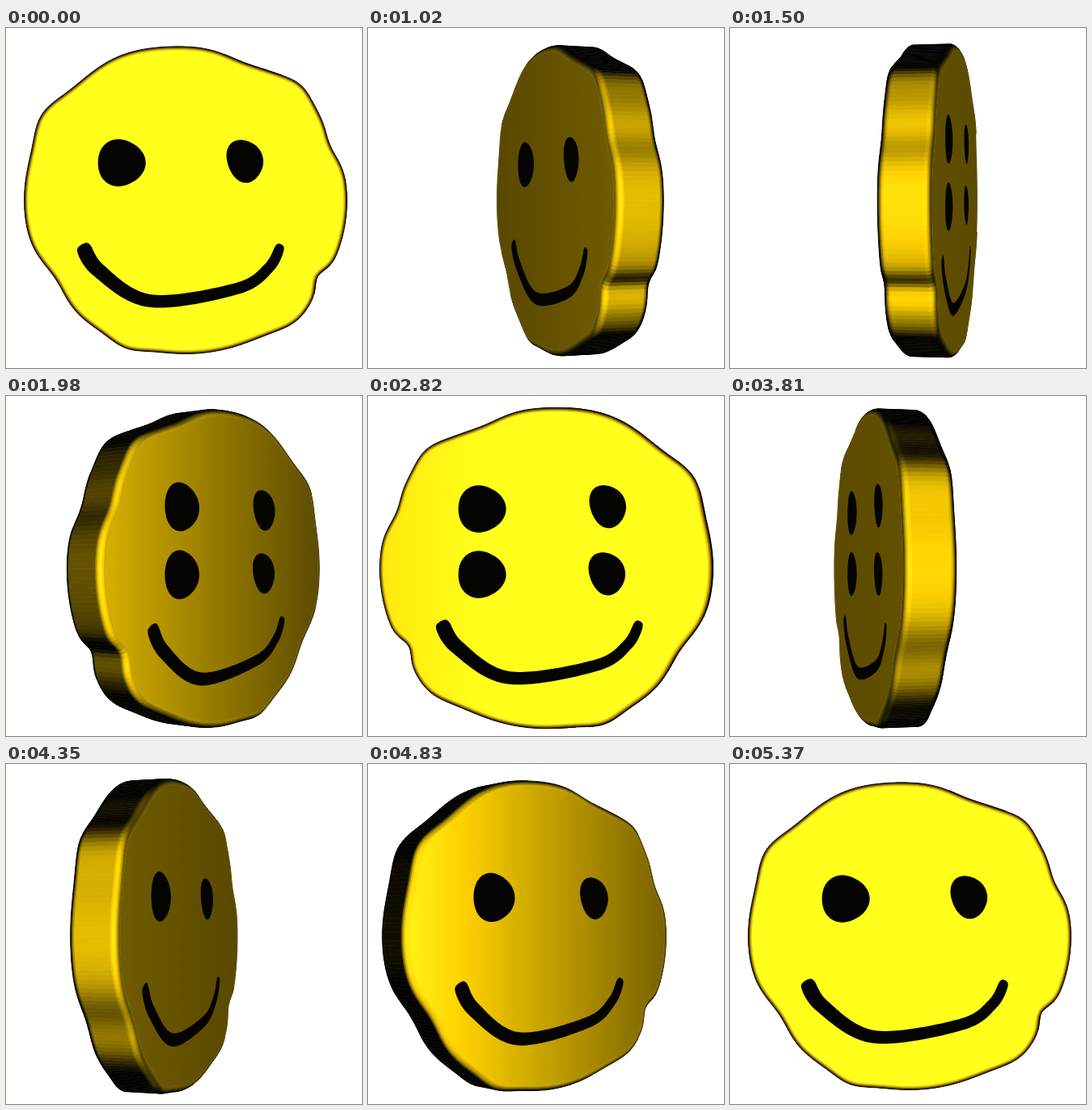
Write an HTML page with a canvas that moves like this. It is 440 by 420 pixels and loops after 5.4 s.

```html
<!DOCTYPE html>
<html lang="en">
<head>
<meta charset="utf-8">
<title>Turning smiley coin</title>
<style>
html, body { margin: 0; width: 100%; height: 100%; overflow: hidden; background: #fff; }
canvas { display: block; }
</style>
</head>
<body>
<canvas id="stage" width="440" height="420"></canvas>
<script>
const ctx = document.getElementById('stage').getContext('2d');
const CX = 223, CY = 212, CAMERA = 1400, RADIUS = 200;
const FRONT = 0, BACK = -59, BEVEL = 8, BEVEL_STEPS = 6;
const LOOP = 5400, STEP = 30, TURN = 2 * Math.PI;
const BACK_POSE = TURN * 2820 / (LOOP - STEP);

const clamp = (v, lo, hi) => Math.min(hi, Math.max(lo, v));
const sample = (n, fn) => Array.from({ length: n }, (_, i) => fn(i / n));

// Dents and bulges of the hand-drawn rim: angle and spread in degrees, height in pixels.
const bumps = [
  { at: 30, height: -9, spread: 5 },
  { at: 47, height: 8, spread: 10 },
  { at: 112, height: 6, spread: 8 },
  { at: 149, height: -9, spread: 11 },
  { at: 211, height: 10, spread: 10 },
  { at: 245, height: 5, spread: 17 },
  { at: 293, height: -6, spread: 11 },
  { at: 315, height: 7, spread: 8 },
  { at: 339, height: -7, spread: 8 }
];

const outline = sample(240, t => {
  const a = t * TURN;
  const r = bumps.reduce((sum, b) => sum + b.height * Math.exp(-(((t * 360 - b.at) / b.spread) ** 2)),
    194.5 + 5 * Math.cos(2 * a));
  return [222 + r * Math.cos(a), 213 + r * Math.sin(a)];
});

// Ellipse with three soft corners.
function blob(cx, cy, rx, ry, tilt) {
  const c = Math.cos(tilt), s = Math.sin(tilt);
  return sample(48, t => {
    const a = t * TURN, k = 1 + 0.04 * Math.cos(3 * a);
    const x = rx * k * Math.cos(a), y = ry * k * Math.sin(a);
    return [cx + x * c - y * s, cy + x * s + y * c];
  });
}

// Point and direction on an open Catmull-Rom curve, t from 0 to 1.
function along(keys, t) {
  const u = t * (keys.length - 1), i = Math.min(Math.floor(u), keys.length - 2), f = u - i;
  const key = j => keys[clamp(j, 0, keys.length - 1)];
  return [0, 1].map(k => {
    const [a, b, c, d] = [-1, 0, 1, 2].map(o => key(i + o)[k]);
    return b + f / 2 * (c - a + f * (2 * a - 5 * b + 4 * c - d + f * (3 * (b - c) + d - a)));
  });
}

// Brush stroke with round ends, thinner towards its end.
function brush(keys) {
  const count = 120, left = [], right = [];
  for (let i = 0; i <= count; i++) {
    const t = i / count, [x, y] = along(keys, t);
    const a = along(keys, Math.max(0, t - 0.01)), b = along(keys, Math.min(1, t + 0.01));
    const dx = b[0] - a[0], dy = b[1] - a[1], len = Math.hypot(dx, dy);
    const w = (6.5 + 4 * (1 - t) ** 2) * Math.sqrt(1 - (2 * t - 1) ** 16);
    left.push([x + dy / len * w, y - dx / len * w]);
    right.unshift([x - dy / len * w, y + dx / len * w]);
  }
  return left.concat(right);
}

const leftEye = blob(142, 166.5, 29.5, 29, 0);
const rightEye = blob(295, 164, 22, 27, -0.35);
const mouth = brush([[94, 267], [114, 299], [178, 337], [285, 322], [325, 296], [340, 267]]);

function rotate([x, y, z], angle) {
  const c = Math.cos(angle), s = Math.sin(angle);
  return [x * c - z * s, y, x * s + z * c];
}

function project(point, angle) {
  const [x, y, z] = rotate(point, angle), k = CAMERA / (CAMERA - z);
  return [CX + x * k, CY + y * k];
}

// Places a stage position on the coin plane z as seen at the given angle.
function unproject([px, py], angle, z) {
  const c = Math.cos(angle), s = Math.sin(angle), sx = px - CX;
  const x = (sx * (CAMERA - z * c) + CAMERA * z * s) / (CAMERA * c + sx * s);
  return [x, (py - CY) * (CAMERA - x * s - z * c) / CAMERA, z];
}

const onFront = shape => shape.map(p => unproject(p, 0, FRONT));
const onBack = (shape, dx, dy) =>
  shape.map(([x, y]) => unproject([x + dx, y + dy], BACK_POSE, BACK));

const frontFeatures = [leftEye, rightEye, mouth].map(onFront);
const backFeatures = [
  onBack(leftEye, -2, -27), onBack(leftEye, -2, 54),
  onBack(rightEye, 1, -28), onBack(rightEye, 0, 55),
  onBack(mouth, -4, 11)
];

const edge = outline.map(p => unproject(p, 0, FRONT - BEVEL));
const normals = edge.map((_, i) => {
  const n = edge.length, a = edge[(i + n - 1) % n], b = edge[(i + 1) % n];
  const tx = b[0] - a[0], ty = b[1] - a[1], len = Math.hypot(tx, ty);
  return [ty / len, -tx / len];
});

// Rings run from the front face over both rounded edges to the back face.
const rings = [];
for (let i = 0; i <= BEVEL_STEPS * 2 + 1; i++) {
  const front = i <= BEVEL_STEPS;
  const tilt = (front ? i : i - 1) / BEVEL_STEPS * Math.PI / 2;
  const inset = BEVEL * (1 - Math.sin(tilt));
  const z = front ? FRONT - BEVEL * (1 - Math.cos(tilt)) : BACK + BEVEL * (1 + Math.cos(tilt));
  rings.push({ tilt, points: edge.map(([x, y], j) =>
    [x - normals[j][0] * inset, y - normals[j][1] * inset, z]) });
}

function gold(v) {
  const base = 255 * Math.pow(clamp(v / 0.92, 0.03, 1), 1.2);
  const glow = clamp((v - 0.92) / 0.16, 0, 1);
  return `rgb(${base | 0},${base * (0.82 + 0.18 * glow) | 0},${27 * glow | 0})`;
}

// side runs from -1 to 1 across the face.
function faceLight(angle, side) {
  const c = Math.abs(Math.cos(angle));
  return 0.4 + 0.77 * c ** 3.5 + 0.9 * Math.sin(angle) * c ** 3 * side;
}

function edgeLight(point, normal, angle) {
  const [x, y, z] = rotate(point, angle), [nx, ny, nz] = rotate(normal, angle);
  const lz = CAMERA - z;
  return 1.75 * ((lz * nz - x * nx - y * ny) / Math.hypot(x, y, lz) - 0.42);
}

function trace(points) {
  ctx.beginPath();
  points.forEach(([x, y]) => ctx.lineTo(x, y));
  ctx.closePath();
}

function drawStrip(inner, outer, a, b, angle, facing) {
  const tilt = (inner.tilt + outer.tilt) / 2, ct = Math.cos(tilt), st = Math.sin(tilt);
  const n = edge.length;
  for (let j = 0; j < n; j++) {
    const k = (j + 1) % n, quad = [a[j], a[k], b[k], b[j]];
    const area = quad.reduce((sum, p, i) => {
      const q = quad[(i + 1) % 4];
      return sum + p[0] * q[1] - q[0] * p[1];
    }, 0);
    if (area >= 0) continue;
    const nx = (normals[j][0] + normals[k][0]) / 2, ny = (normals[j][1] + normals[k][1]) / 2;
    const p = inner.points[j];
    const spill = facing * ct > 0 ? faceLight(angle, p[0] / RADIUS) * ct ** 4 : 0;
    const light = Math.max(edgeLight(p, [nx * st, ny * st, ct], angle), spill);
    ctx.fillStyle = ctx.strokeStyle = gold(light);
    trace(quad);
    ctx.fill();
    ctx.stroke();
  }
}

function drawFace(points, z, features, angle) {
  const left = project([-RADIUS, 0, z], angle)[0], right = project([RADIUS, 0, z], angle)[0];
  const across = ctx.createLinearGradient(left, 0, right, 0);
  for (let i = 0; i <= 10; i++) across.addColorStop(i / 10, gold(faceLight(angle, i / 5 - 1)));
  trace(points);
  ctx.fillStyle = across;
  ctx.fill();

  ctx.fillStyle = '#050400';
  for (const shape of features) {
    trace(shape.map(p => project(p, angle)));
    ctx.fill();
  }
}

function draw(time) {
  const angle = TURN * Math.floor(time % LOOP / STEP) * STEP / (LOOP - STEP);
  const view = CAMERA * Math.cos(angle);
  const facing = view > FRONT ? 1 : view < BACK ? -1 : 0;
  const flat = rings.map(r => r.points.map(p => project(p, angle)));

  ctx.fillStyle = '#fff';
  ctx.fillRect(0, 0, 440, 420);
  ctx.lineWidth = 0.7;
  ctx.lineJoin = 'round';
  for (let i = 0; i < rings.length - 1; i++) {
    const r = facing < 0 ? i : rings.length - 2 - i;
    drawStrip(rings[r], rings[r + 1], flat[r], flat[r + 1], angle, facing);
  }
  if (facing > 0) drawFace(flat[0], FRONT, frontFeatures, angle);
  if (facing < 0) drawFace(flat[flat.length - 1], BACK, backFeatures, angle);
}

const start = performance.now();
function tick() {
  draw(performance.now() - start);
  requestAnimationFrame(tick);
}
tick();
</script>
</body>
</html>
```
